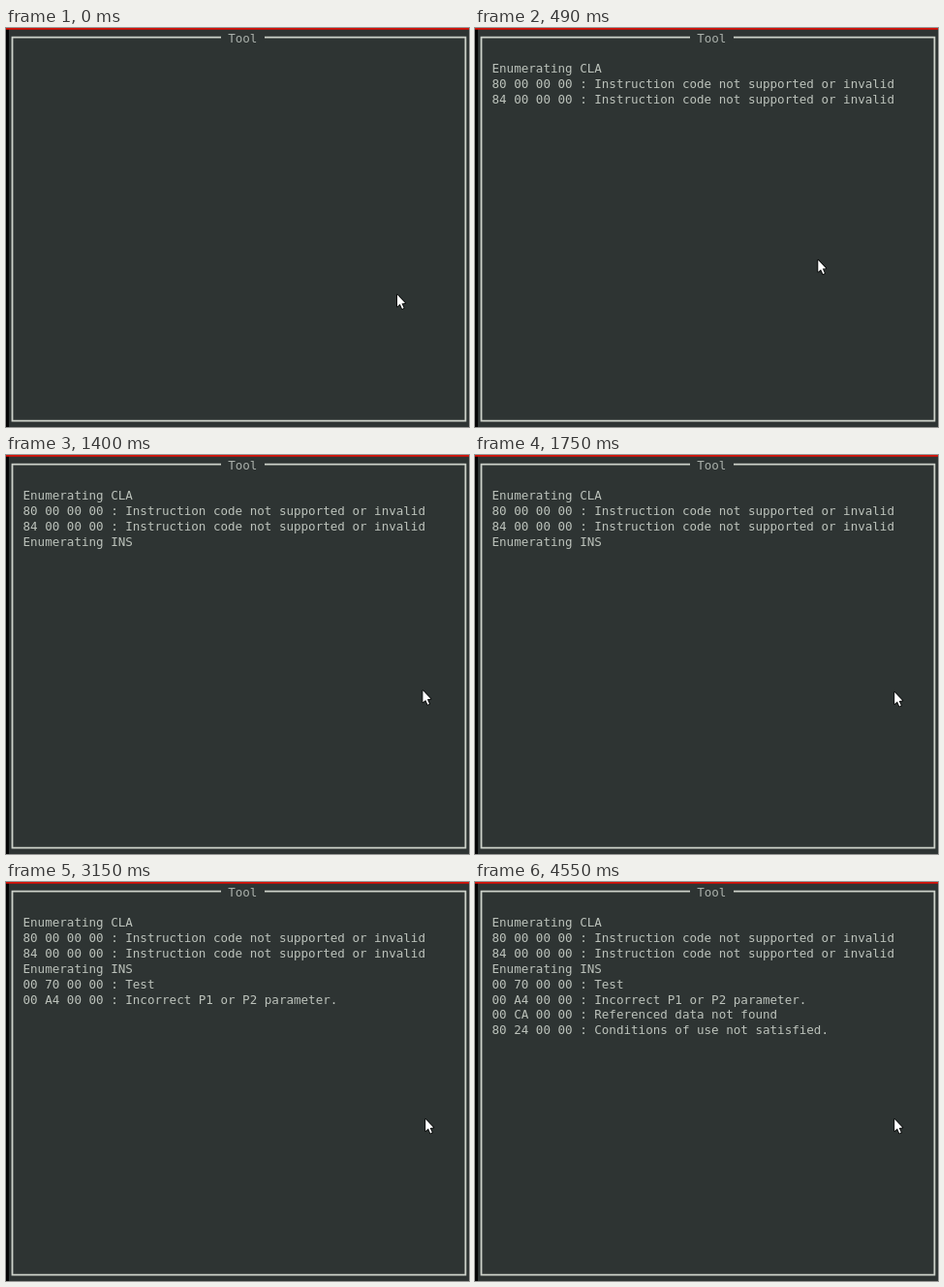
An HTML page with a canvas that plays this animation: 478 by 412 pixels, repeating every 8 s.

```html
<!DOCTYPE html>
<html lang="en">
<head>
<meta charset="utf-8">
<title>Tool</title>
<style>
html, body { margin: 0; width: 100%; height: 100%; overflow: hidden; background: #2e3433; }
canvas { display: block; }
</style>
</head>
<body>
<canvas id="stage" width="478" height="412"></canvas>
<script>
const ctx = document.getElementById('stage').getContext('2d');
const LOOP = 8000;
const TICK = 70;
const FONT = '12.55px "DejaVu Sans Mono", monospace';

const lines = [
  { at: 210, text: 'Enumerating CLA' },
  { at: 210, text: '80 00 00 00 : Instruction code not supported or invalid' },
  { at: 210, text: '84 00 00 00 : Instruction code not supported or invalid' },
  { at: 1400, text: 'Enumerating INS' },
  { at: 2590, text: '00 70 00 00 : Test' },
  { at: 3150, text: '00 A4 00 00 : Incorrect P1 or P2 parameter.' },
  { at: 3500, text: '00 CA 00 00 : Referenced data not found' },
  { at: 4550, text: '80 24 00 00 : Conditions of use not satisfied.' }
];

// Each move reaches its point in a number of equal ticks.
const home = { x: 403, y: 274.5 };
const moves = [
  { at: 70, steps: 1, x: 390.2, y: 261.8 },
  { at: 350, steps: 4, x: 341, y: 231 },
  { at: 910, steps: 1, x: 350.4, y: 230.2 },
  { at: 980, steps: 2, x: 429.4, y: 242.3 },
  { at: 1680, steps: 2, x: 432.2, y: 244 }
];

function pointerAt(t) {
  let { x, y } = home;
  for (const m of moves) {
    if (t < m.at) break;
    const k = Math.min(1, (Math.floor((t - m.at) / TICK) + 1) / m.steps);
    x += (m.x - x) * k;
    y += (m.y - y) * k;
  }
  return { x, y };
}

function rect(color, x, y, w, h) {
  ctx.fillStyle = color;
  ctx.fillRect(x, y, w, h);
}

function drawWindow() {
  rect('#2e3433', 0, 0, 478, 412);
  rect('#050505', 0, 0, 3, 412);
  rect('#dc1006', 0, 0, 478, 1.7);

  ctx.strokeStyle = '#cdd2ca';
  ctx.lineWidth = 1.8;
  ctx.beginPath();
  ctx.moveTo(222, 9.7);
  ctx.lineTo(6.5, 9.7);
  ctx.lineTo(6.5, 405.6);
  ctx.lineTo(474.4, 405.6);
  ctx.lineTo(474.4, 9.7);
  ctx.lineTo(267, 9.7);
  ctx.stroke();
}

function drawText(t) {
  ctx.font = FONT;
  ctx.fillStyle = '#a9afaa';
  ctx.fillText('Tool', 229.2, 14.7);
  ctx.fillStyle = '#bcc2bb';
  lines.forEach(({ at, text }, i) => {
    if (t >= at) ctx.fillText(text, 17.5, 46.4 + i * 15.83);
  });
}

function drawPointer(t) {
  const { x, y } = pointerAt(t);
  ctx.save();
  ctx.translate(x, y);
  const arrow = new Path2D('M1 1V13L3.8 10.6L6 15.4L7.6 14.6L5.5 9.9L9 9.5Z');
  ctx.lineJoin = 'round';
  ctx.lineWidth = 1.8;
  ctx.strokeStyle = '#0a0c0c';
  ctx.stroke(arrow);
  ctx.fillStyle = '#fff';
  ctx.fill(arrow);
  ctx.restore();
}

const start = performance.now();

function frame() {
  const t = (performance.now() - start) % LOOP;
  drawWindow();
  drawText(t);
  drawPointer(t);
  requestAnimationFrame(frame);
}
frame();
</script>
</body>
</html>
```
